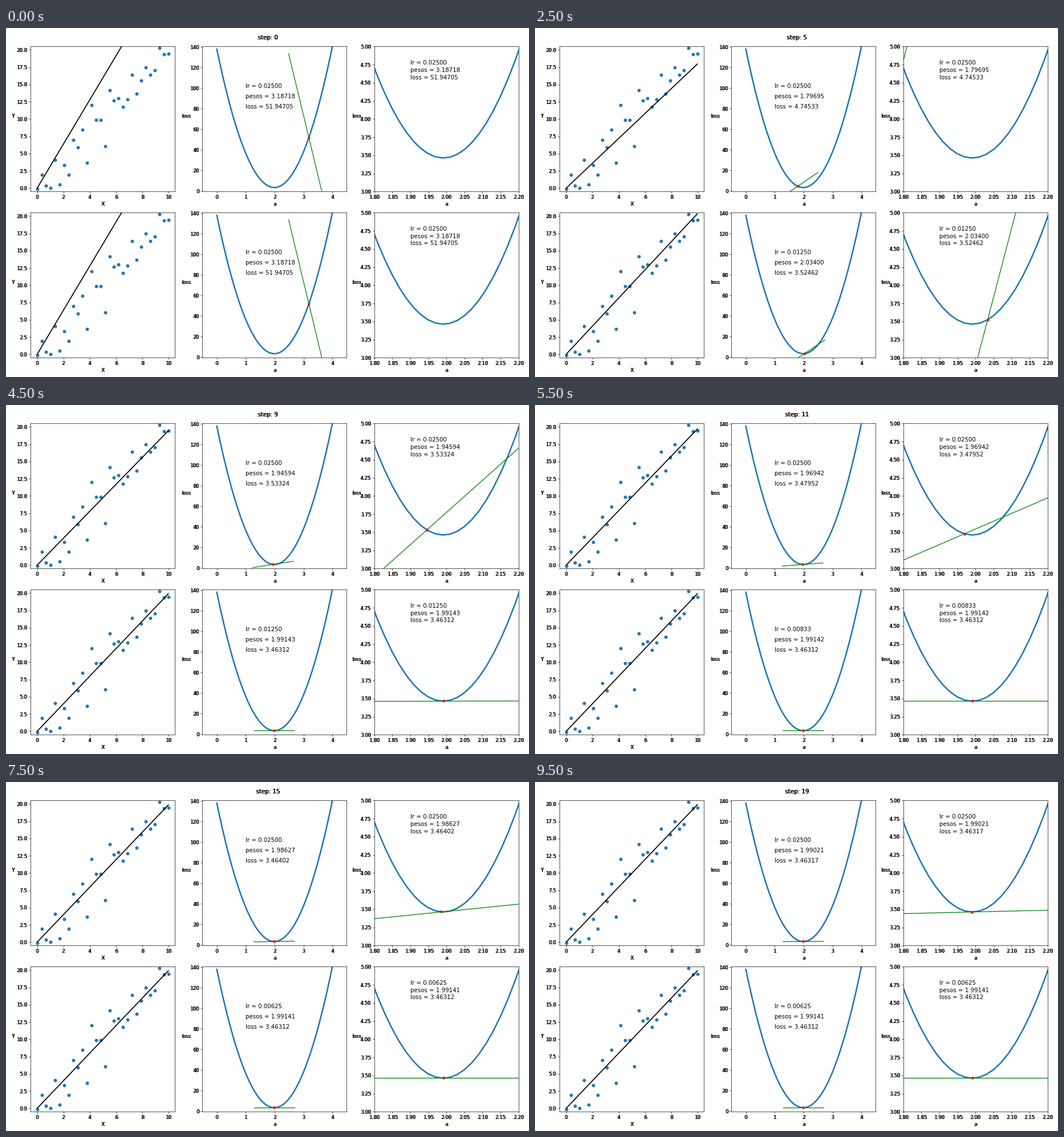
Write a matplotlib script that moves like this. It is 917 by 611 pixels and loops after 10000 ms.

```python
import numpy as np
import matplotlib.pyplot as plt
from matplotlib.animation import FuncAnimation

WIDTH, HEIGHT, DPI = 917, 611, 61.125
STEPS, INTERVAL = 20, 500
LEFTS, TOPS = (43.1, 344.35, 645.6), (32.4, 323.3)
AX_W, AX_H = 253.1, 254.0

X = np.linspace(0, 10, 30)
Y = [-0.12, 1.9, 0.37, 0.04, 4.05, 0.54, 3.35, 1.94, 6.94, 5.91,
     8.43, 3.64, 12.02, 9.83, 9.83, 6.03, 14.17, 12.69, 13.02, 11.78,
     12.81, 16.4, 13.68, 15.58, 17.48, 16.4, 17.02, 20.29, 19.38, 19.46]

BEST, MIN_LOSS, CURVATURE = 1.9914115, 3.4631184, np.mean(X ** 2)
FIRST_WEIGHT = 3.1871812
BASE_LR = 0.025


def loss(a):
    return MIN_LOSS + CURVATURE * (a - BEST) ** 2


def gradient(a):
    return 2 * CURVATURE * (a - BEST)


def descend(decay):
    """Return (lr, weight, gradient of the update) for every step."""
    a = BEST + (FIRST_WEIGHT - BEST) / (1 - 2 * CURVATURE * BASE_LR)
    history = []
    for step in range(STEPS):
        lr = BASE_LR / (1 + step // 5) if decay else BASE_LR
        slope = gradient(a)
        a -= lr * slope
        history.append((lr, a, slope))
    return history


fig = plt.figure(figsize=((WIDTH + 1e-6) / DPI, (HEIGHT + 1e-6) / DPI), dpi=DPI)
# Labels are drawn twice, one pixel apart, which makes them heavy.
titles = [fig.text(0.5 + shift / WIDTH, 0.98, "", fontsize=12, ha="center", va="top")
          for shift in (0, 1)]


def make_axes(left, top, xlim, ylim, xlabel, ylabel):
    ax = fig.add_axes([left / WIDTH, 1 - (top + AX_H) / HEIGHT,
                       AX_W / WIDTH, AX_H / HEIGHT], facecolor="none")
    ax.set(xlim=xlim, ylim=ylim)
    ax.set_xlabel(xlabel, labelpad=3)
    ax.set_ylabel(ylabel, rotation=0, labelpad=8)
    return ax


def make_panel(left, top, *settings):
    ghost = make_axes(left + 1, top, *settings)
    ghost.set_frame_on(False)
    ghost.tick_params(length=0, pad=7)
    return make_axes(left, top, *settings)


class LossPanel:
    def __init__(self, left, top, xlim, ylim, text_x, text_ys):
        ax = make_panel(left, top, xlim, ylim, "a", "loss")
        a = np.linspace(0, 4, 200)
        ax.plot(a, loss(a), lw=3)
        self.tangent, = ax.plot([], [], "g")
        self.star, = ax.plot([], [], "r*")
        self.texts = [ax.text(text_x, y, "", fontsize=12) for y in text_ys]

    def update(self, lr, a, slope):
        ends = np.array([a - 0.7, a + 0.7])
        self.tangent.set_data(ends, loss(a) + slope * (ends - a))
        self.star.set_data([a], [loss(a)])
        for text, name, value in zip(self.texts, ("lr", "pesos", "loss"),
                                     (lr, a, loss(a))):
            text.set_text(f"{name} = {value:.5f}")


class Row:
    def __init__(self, top, decay):
        self.history = descend(decay)
        ax = make_panel(LEFTS[0], top, (-0.5, 10.5), (-0.5, 20.5), "X", "Y")
        ax.scatter(X, Y)
        self.fit, = ax.plot([], [], "k", lw=2)
        self.panels = [
            LossPanel(LEFTS[1], top, (-0.5, 4.5), (-0.5, 140.5), 1, (100, 90, 80)),
            LossPanel(LEFTS[2], top, (1.8, 2.2), (3, 5), 1.9, (4.75, 4.65, 4.55)),
        ]

    def update(self, step):
        lr, a, slope = self.history[step]
        self.fit.set_data([0, 10], [0, 10 * a])
        for panel in self.panels:
            panel.update(lr, a, slope)


rows = [Row(TOPS[0], decay=False), Row(TOPS[1], decay=True)]


def update(step):
    for title in titles:
        title.set_text(f"step: {step}")
    for row in rows:
        row.update(step)
    return []


anim = FuncAnimation(fig, update, frames=STEPS, interval=INTERVAL,
                     init_func=lambda: update(0), repeat=True, repeat_delay=0)
plt.show()
```
